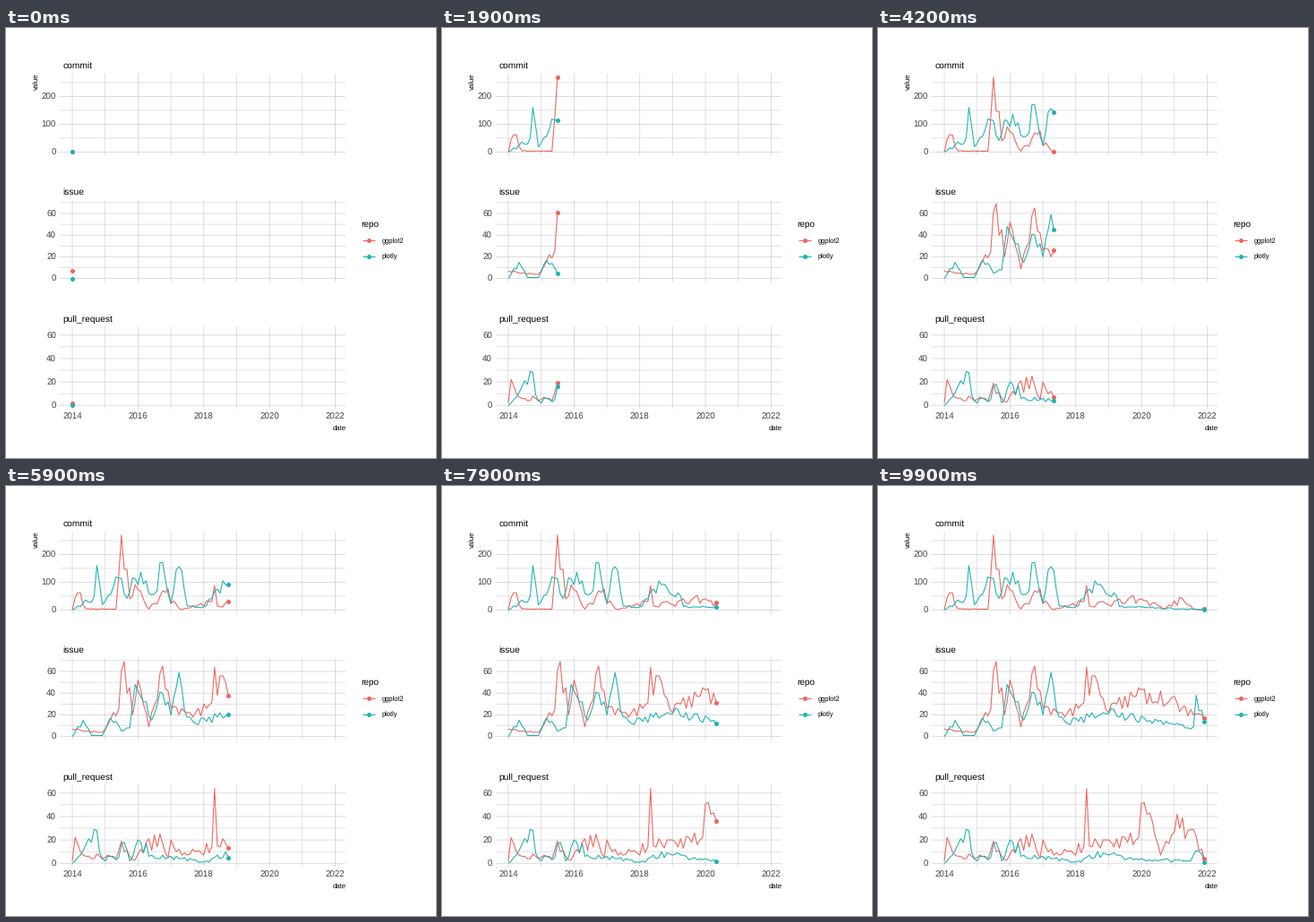
Write a matplotlib script that moves like this. It is 480 px wide and 480 px high and loops after 10000 ms.

```python
import matplotlib.pyplot as plt
import numpy as np
from matplotlib.animation import FuncAnimation

SIZE, DPI, FRAMES = 480, 72, 100
RED, TEAL = "#ef645c", "#1cb2b5"
GRID, TICK = "#cccccc", "#444444"
LEFT, WIDTH, HEIGHT = 59.5, 319.4, 92
MONTHS = 96

plt.rcParams["font.family"] = "Liberation Sans"
plt.rcParams["text.hinting"] = "none"


def days(dates):
    """Days since the start of 2014."""
    start = np.datetime64("2014-01-01")
    return (np.asarray(dates, "datetime64[D]") - start).astype(float)


def series(seed, jitter, *keys):
    """Monthly counts: (month, value) turning points, seeded noise between."""
    at, level = zip(*keys)
    month = np.arange(MONTHS)
    noise = np.random.default_rng(seed).uniform(1 - jitter, 1 + jitter, MONTHS)
    noise[list(at)] = 1
    return np.round(np.interp(month, at, level) * noise)


months = days(np.arange("2014-01", "2022-01", dtype="datetime64[M]"))
span = months[-1]
years = days([f"{y}-01-01" for y in range(2014, 2023)])
# Each month lands on its nearest frame; empty frames are interpolated
month_frame = np.round(months / span * (FRAMES - 1))

commit = (
    series(1, 0.5, (0, 0), (2, 62), (5, 4), (16, 3), (18, 270), (21, 40),
           (24, 72), (28, 3), (34, 64), (40, 1), (51, 30), (52, 88),
           (53, 16), (72, 40), (80, 4), (87, 40), (91, 3), (95, 3)),
    series(2, 0.4, (0, 0), (8, 49), (9, 160), (11, 19), (18, 114), (20, 42),
           (23, 112), (31, 70), (32, 170), (36, 25), (39, 156), (42, 15),
           (47, 8), (57, 93), (63, 50), (64, 12), (91, 3), (95, 1)),
)
issue = (
    series(3, 0.25, (0, 7), (11, 4), (17, 25), (18, 61), (19, 69), (22, 20),
           (24, 52), (28, 9), (33, 65), (36, 26), (44, 18), (51, 31),
           (52, 64), (53, 38), (55, 56), (59, 25), (75, 40), (95, 17)),
    series(4, 0.25, (0, 0), (4, 15), (7, 1), (11, 1), (14, 17), (18, 5),
           (21, 8), (23, 48), (29, 15), (33, 40), (36, 20), (39, 59),
           (41, 24), (45, 12), (58, 22), (91, 9), (92, 38), (95, 14)),
)
pull_request = (
    series(5, 0.4, (0, 2), (1, 22), (4, 7), (16, 4), (18, 19), (22, 3),
           (32, 25), (35, 5), (36, 20), (40, 7), (51, 14), (52, 64),
           (53, 15), (71, 22), (72, 51), (79, 7), (87, 39), (95, 4)),
    series(6, 0.5, (0, 0), (4, 11), (9, 28), (11, 4), (17, 5), (19, 18),
           (21, 2), (24, 20), (30, 5), (40, 4), (48, 1), (58, 9),
           (69, 3), (90, 2), (93, 10), (95, 1)),
)

fig = plt.figure(figsize=(SIZE / DPI, SIZE / DPI), dpi=DPI, facecolor="white")


def label(x, y, text, size, **kw):
    fig.text(x / SIZE, 1 - y / SIZE, text, size=size, **kw)


def line_and_dot(ax, color, order=1):
    line, = ax.plot([], [], color=color, lw=1.07, zorder=order,
                    solid_joinstyle="round", solid_capstyle="butt")
    dot, = ax.plot([], [], "o", color=color, ms=5, mew=0,
                   zorder=order + 2, clip_on=False, snap=False)
    return line, dot


def panel(title, bottom, step, top):
    ax = fig.add_axes([LEFT / SIZE, 1 - bottom / SIZE,
                       WIDTH / SIZE, HEIGHT / SIZE], frameon=False)
    high = 1.05 * top
    ax.set(xlim=(-0.05 * span, 1.05 * span), ylim=(-0.05 * top, high),
           xticks=[], yticks=np.arange(0, high, step))
    ax.tick_params(length=0, pad=3.5, labelsize=9.8, labelcolor=TICK)
    for rule, places in [(ax.axhline, np.arange(0, high, step / 2)),
                         (ax.axvline, years)]:
        for i, place in enumerate(places):
            rule(place, color=GRID, lw=0.55 if i % 2 else 0.65,
                 zorder=0, snap=False)
    label(63.7, bottom - 97.8, title, 10.3)
    return ax


traces = []
for title, bottom, step, top, (ggplot2, plotly) in [
        ("commit", 142.6, 100, 270, commit),
        ("issue", 283.9, 20, 69, issue),
        ("pull_request", 425.4, 20, 64, pull_request)]:
    ax = panel(title, bottom, step, top)
    traces.append((ggplot2, *line_and_dot(ax, RED, 2)))
    traces.append((plotly, *line_and_dot(ax, TEAL, 3)))

ax.set_xticks(years[::2], range(2014, 2023, 2))
ax.tick_params(axis="x", pad=4)
label(379.3, 448.8, "date", 7.8, ha="right")
label(34, 50, "value", 7.8, rotation=90, ha="center", va="top")

label(396, 222, "repo", 10)
legend = fig.add_axes([0, 0, 1, 1], frameon=False)
legend.set(xlim=(0, SIZE), ylim=(SIZE, 0), xticks=[], yticks=[])
for name, y, color in [("ggplot2", 237.4, RED), ("plotly", 254.6, TEAL)]:
    line, dot = line_and_dot(legend, color)
    line.set_data([397.8, 412.2], [y, y])
    dot.set_data([405], [y])
    label(419.5, y + 3.2, name, 7.5)


def draw(frame):
    now = np.interp(frame, month_frame, months)
    past = months < now
    x = np.append(months[past], now)
    artists = []
    for values, line, dot in traces:
        y = np.interp(now, months, values)
        line.set_data(x, np.append(values[past], y))
        dot.set_data([now], [y])
        artists += [line, dot]
    return artists


anim = FuncAnimation(fig, draw, frames=FRAMES, interval=100,
                     repeat=True, repeat_delay=0)
plt.show()
```
